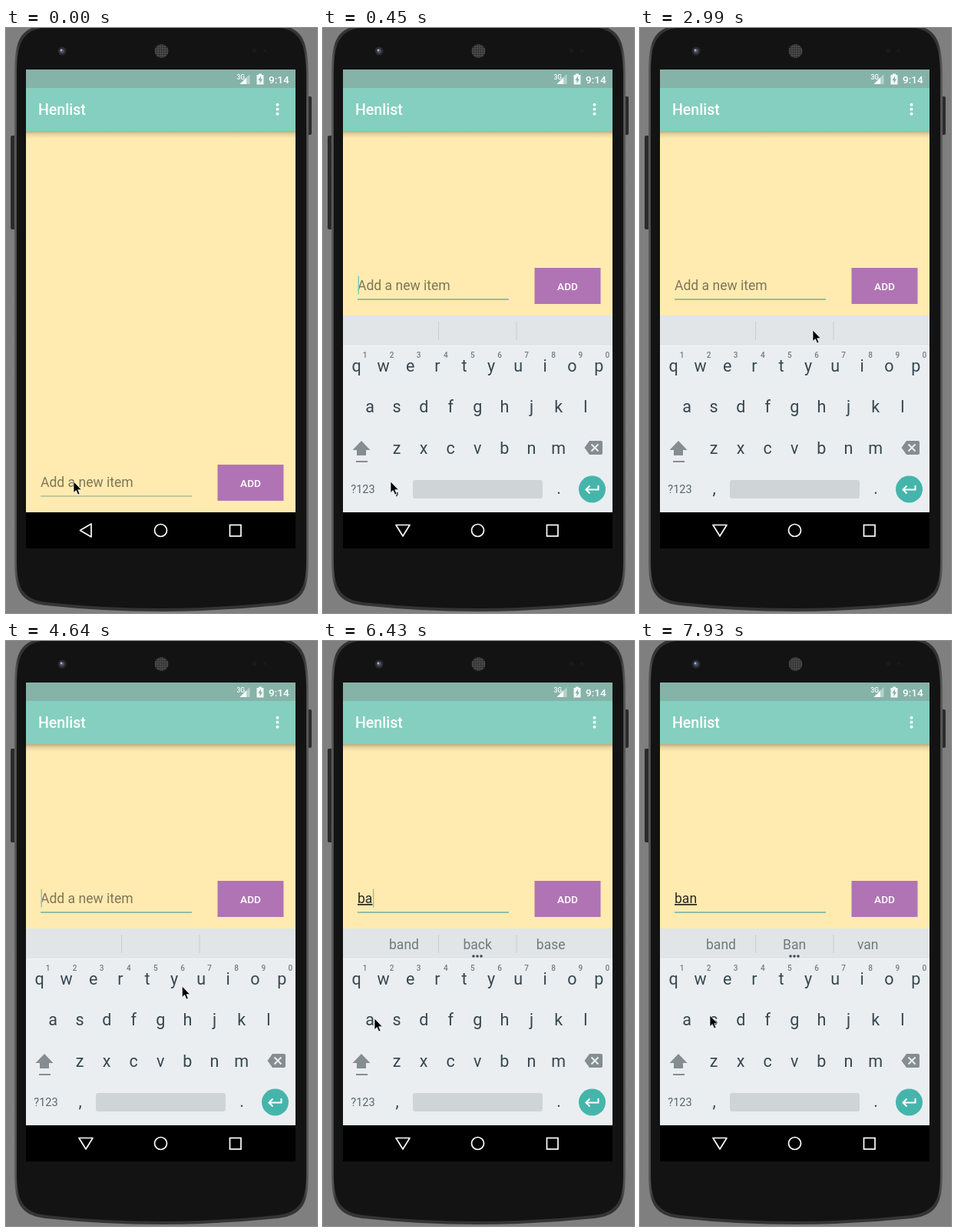
Recreate the animation shown at these times as an HTML page. Size 405 by 761 pixels, loop 8 s.

```html
<!DOCTYPE html>
<html lang="en">
<head>
<meta charset="utf-8">
<title>To-do entry on a phone</title>
<style>
  html, body { margin: 0; width: 100%; height: 100%; overflow: hidden; background: #7f7f7f; }
  svg { display: block; width: 405px; height: 761px; font-family: Roboto, sans-serif; }
  .mid { text-anchor: middle; }
  .medium { font-weight: 500; }
  .key { font-size: 21.5px; fill: #37474f; }
  .digit { font-size: 10px; font-weight: 500; fill: #747d82; }
  .suggestion { font-size: 17.5px; fill: #70797d; }
</style>
</head>
<body>
<svg viewBox="0 0 405 761" xmlns="http://www.w3.org/2000/svg">
  <defs>
    <clipPath id="screenClip"><rect x="26" y="54" width="351" height="623"/></clipPath>
    <linearGradient id="barShadow" x2="0" y2="1">
      <stop stop-opacity=".27"/><stop offset=".45" stop-opacity=".09"/><stop offset="1" stop-opacity="0"/>
    </linearGradient>
    <linearGradient id="rim">
      <stop stop-color="#606060"/><stop offset=".015" stop-color="#343434"/>
      <stop offset=".985" stop-color="#343434"/><stop offset="1" stop-color="#606060"/>
    </linearGradient>
    <pattern id="mesh" width="3" height="3" patternUnits="userSpaceOnUse">
      <rect width="3" height="3" fill="#4b4b4b"/><circle cx="1.5" cy="1.5" r="1" fill="#272727"/>
    </pattern>
    <filter id="popupShadow" x="-20%" y="-10%" width="140%" height="125%">
      <feDropShadow dx="0" dy="1" stdDeviation="1" flood-opacity=".45"/>
    </filter>
  </defs>

  <g id="phone">
    <rect x="6" y="140" width="8" height="122" rx="2" fill="#2b2b2b"/>
    <rect x="391" y="89" width="7" height="50" rx="2" fill="#2b2b2b"/>
    <path fill="url(#rim)" d="M11 60C11 24 15 2 44 -3H361C389 2 393 24 394 60V694C394 730 387 747 354 751Q202 767 51 751C18 747 11 730 11 694Z"/>
    <path fill="#131313" d="M14 60C14 27 18 5 46 0H359C386 5 390 27 391 60V692C391 727 384 743 353 747Q202 763 52 747C21 743 14 727 14 692Z"/>
    <circle cx="73" cy="30" r="5.5" fill="#292b31"/>
    <circle cx="73" cy="30" r="3" fill="#4a4f64"/>
    <circle cx="72" cy="29" r="1.4" fill="#a9afc4"/>
    <circle cx="202.500" cy="30" r="9" fill="url(#mesh)"/>
    <circle cx="323.500" cy="29.500" r="3" fill="#1d1918"/>
    <circle cx="337" cy="29.500" r="2" fill="#1d1918"/>
  </g>

  <g clip-path="url(#screenClip)">
    <rect x="26" y="54" width="351" height="623" fill="#ffebb0"/>
    <rect x="26" y="134" width="351" height="10" fill="url(#barShadow)"/>
    <rect x="26" y="54" width="351" height="24" fill="#85b3a8"/>
    <rect x="26" y="78" width="351" height="56" fill="#84cfbf"/>
    <g fill="#fff">
      <text x="300.500" y="66.500" font-size="8.500" class="medium">3G</text>
      <path d="M317.500 60V73H304.500Z" opacity=".4"/>
      <path d="M313 64.500V73H304.500Z"/>
      <path d="M329 59.500h4v1.500h2.500v12.500h-9V61h2.500Z" opacity=".9"/>
      <path d="M332 62.500l-3.500 5.500h2v4l3.500-5.500h-2Z" fill="#85b3a8"/>
      <text x="342" y="71.500" font-size="13.650" class="medium">9:14</text>
      <text x="42" y="113" font-size="19.500" class="medium">Henlist</text>
      <circle cx="353.500" cy="99.700" r="2"/>
      <circle cx="353.500" cy="105.700" r="2"/>
      <circle cx="353.500" cy="111.700" r="2"/>
    </g>

    <g id="entry">
      <text id="hint" x="45" y="597" font-size="17.550" fill="#7f7658">Add a new item</text>
      <text id="typed" x="45" y="597" font-size="17.550" fill="#2b281f" text-decoration="underline"></text>
      <rect id="line" x="45" width="197"/>
      <rect id="caret" y="578.500" width="1.500" height="24" fill="#7fcabb"/>
      <rect x="275.500" y="568" width="86" height="47" fill="#b074b5"/>
      <text x="318.500" y="596.500" font-size="13.650" fill="#fff" class="mid medium">ADD</text>
    </g>

    <rect x="26" y="630" width="351" height="47"/>
    <rect id="imeBack" x="26" y="374" width="351" height="256" fill="#ebebeb"/>
    <g id="keyboard">
      <rect x="26" y="374" width="351" height="256" fill="#eaeef1"/>
      <rect x="26" y="374" width="351" height="39" fill="#e1e5e8"/>
      <path d="M26 413.500H377" stroke="#f4f6f7"/>
      <path d="M150.500 382V406M252 382V406" stroke="#c9cdd0"/>
      <g id="suggestions"></g>
      <g id="keys"></g>
      <g fill="#858d91">
        <path d="M50 537L61.500 549H56V556H44V549H38.500Z"/>
        <rect x="43" y="563" width="15" height="2"/>
        <path d="M347 537H362Q364 537 364 539V553Q364 555 362 555H347L340.500 546Z"/>
      </g>
      <path d="M349.500 541.500l9 9m0-9l-9 9" stroke="#eaeef1" stroke-width="2"/>
      <text x="52" y="605" font-size="14.500" fill="#59666c" class="mid">?123</text>
      <text x="96.500" y="606" class="key mid">,</text>
      <rect x="117" y="588" width="169" height="24" rx="3" fill="#cfd4d7"/>
      <text x="307" y="606" class="key mid">.</text>
      <circle cx="350.500" cy="600" r="17.500" fill="#45b5ab"/>
      <path d="M358.500 595V600.500H343M347.500 595.500L342.500 600.500L347.500 605.500" fill="none" stroke="#fff" stroke-width="2"/>
    </g>
    <g fill="none" stroke="#fff" stroke-width="1.700">
      <path id="back" stroke-linejoin="round"/>
      <circle cx="201.500" cy="653.500" r="8"/>
      <rect x="291.500" y="646.500" width="14.500" height="14.500"/>
    </g>
    <g id="popup">
      <rect x="-24.500" y="-91" width="49" height="106" rx="2" fill="#cfd4d7" filter="url(#popupShadow)"/>
      <text id="popupLetter" y="-53" font-size="30" fill="#37474f" class="mid"></text>
    </g>
  </g>
  <path id="pointer" d="M0 0V14.500L3.300 11.500L5.700 17L8 16L5.700 10.700H10.300Z" stroke="#fff" stroke-width=".7"/>
</svg>

<script>
const LOOP = 8000, TICK = 150, PITCH = 35.1;
const el = id => document.getElementById(id);
const show = (id, on) => el(id).setAttribute('visibility', on ? 'visible' : 'hidden');
const set = (id, attrs) => Object.entries(attrs).forEach(([k, v]) => el(id).setAttribute(k, v));

const rows = [
  { letters: 'qwertyuiop', x: 43.5, y: 447 },
  { letters: 'asdfghjkl', x: 61, y: 500 },
  { letters: 'zxcvbnm', x: 96, y: 554 }
];
const keyPos = {};
let keysMarkup = '';
rows.forEach((row, r) => [...row.letters].forEach((letter, i) => {
  const x = row.x + i * PITCH;
  keyPos[letter] = [x, row.y];
  keysMarkup += `<text class="key mid" x="${x}" y="${row.y}">${letter}</text>`;
  if (r === 0) keysMarkup += `<text class="digit mid" x="${x + 11}" y="428.500">${(i + 1) % 10}</text>`;
}));
el('keys').innerHTML = keysMarkup;

// Pointer path: time, x, y
const path = [
  [0, 88, 590], [750, 88, 590], [1200, 118, 520], [1500, 150, 435], [1800, 199, 420],
  [1950, 215, 450], [2250, 239, 552], [2550, 236, 546], [2700, 236, 546], [2990, 225, 393],
  [4490, 225, 393], [4940, 238, 561], [5390, 238, 561], [5540, 205, 528], [5990, 67, 491],
  [6430, 67, 491], [6730, 272, 563], [7480, 272, 563], [7780, 77, 487], [7930, 91, 487]
];
const caretFlips = [150, 900, 1350, 1950, 2400, 2850, 3590, 4040, 4640, 5090,
  5390, 5990, 6280, 6730, 7030, 7630];
const presses = [['b', 5240, 5690], ['a', 6130, 6430], ['n', 6880, 7180]];
const typing = [[0, ''], [5390, 'b'], [6280, 'ba'], [7030, 'ban']];
const hints = [[0, []], [6430, ['band', 'back', 'base']], [7180, ['band', 'Ban', 'van']]];

const latest = (list, t) => list.filter(item => item[0] <= t).pop()[1];

function tickTime(t) {
  const base = t < 2990 ? 0 : t < 6130 ? 2990 : 6130;
  return base + Math.floor((t - base) / TICK) * TICK;
}

function pointerAt(t) {
  const i = path.findIndex(p => p[0] > t);
  if (i < 0) return path[path.length - 1].slice(1);
  const [t0, x0, y0] = path[i - 1], [t1, x1, y1] = path[i];
  const k = (t - t0) / (t1 - t0);
  return [x0 + (x1 - x0) * k, y0 + (y1 - y0) * k];
}

function draw(now) {
  const t = tickTime(now);
  const focused = t >= 150, open = t >= 300, sliding = open && t < 450;
  const text = latest(typing, t), words = latest(hints, t);

  set('entry', { transform: `translate(0 ${open ? -256 : 0})` });
  set('line', focused ? { y: 608, height: 2, fill: '#94bda5' } : { y: 608.5, height: 1, fill: '#7fa68f' });
  show('hint', !text);
  el('typed').textContent = text;
  set('caret', { x: 45.5 + text.length * 9.7 });
  show('caret', caretFlips.filter(f => f <= t).length % 2);

  show('imeBack', open);
  show('keyboard', open);
  set('keyboard', { transform: `translate(0 ${sliding ? 60 : 0})`, opacity: sliding ? 0.5 : 1 });
  set('back', { d: open ? 'M95 646.500H113L104 661Z' : 'M96.500 653.500L111 645V662Z' });

  el('suggestions').innerHTML = words.map((word, i) =>
    `<text class="suggestion mid" x="${105.5 + i * 95.6}" y="401">${word}</text>` +
    `<circle cx="${196 + i * 5}" cy="410" r="1.700" fill="#37474f"/>`).join('');

  const press = presses.find(([, from, to]) => t >= from && t < to);
  show('popup', press);
  if (press) {
    set('popup', { transform: `translate(${keyPos[press[0]]})` });
    el('popupLetter').textContent = press[0];
  }
  set('pointer', { transform: `translate(${pointerAt(t)})` });
}

const start = performance.now();
function frame() {
  draw((performance.now() - start) % LOOP);
  requestAnimationFrame(frame);
}
frame();
</script>
</body>
</html>
```
